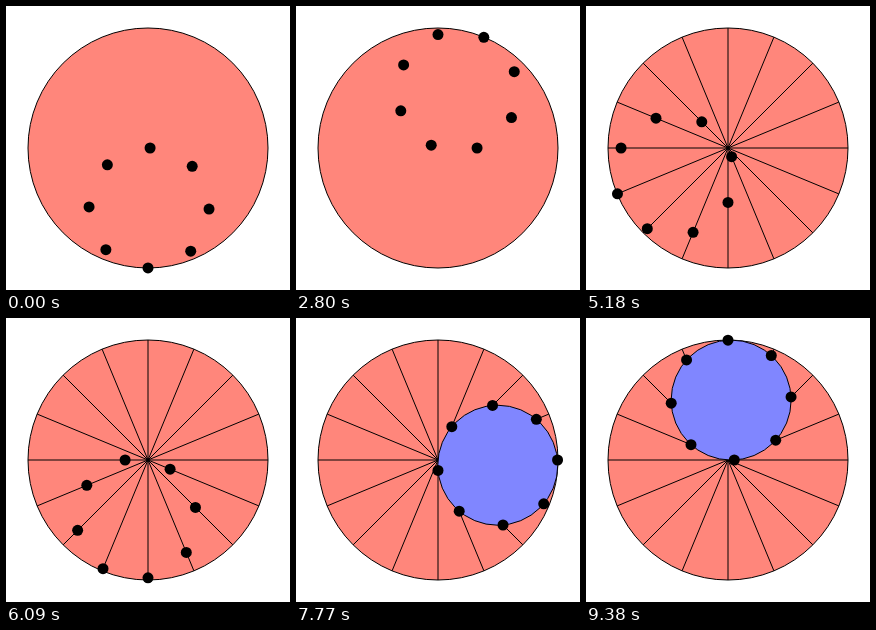
Animation of 284 by 284 pixels, one loop 9.45 s. Source, as an HTML page:

```html
<!DOCTYPE html>
<html lang="en">
<head>
<meta charset="utf-8">
<title>Rolling circle</title>
<style>
  html, body { margin: 0; width: 100%; height: 100%; overflow: hidden; background: #fff; }
  svg { display: block; width: 100%; height: 100%; }
  .outline { stroke: #000; stroke-width: 1; }
</style>
</head>
<body>
<svg viewBox="0 0 284 284">
  <g id="stage" transform="translate(142 142)">
    <circle class="outline" r="120" fill="#ff867b"/>
  </g>
</svg>
<script>
const RADIUS = 120, DOTS = 8;
const STEP_MS = 70, STEPS = 135, DEGREES_PER_STEP = 4;
const SPOKES_FROM = 45, DISC_FROM = 90;
const rad = degrees => degrees * Math.PI / 180;
const stage = document.getElementById('stage');

function add(tag, attributes, parent = stage) {
  const node = document.createElementNS(stage.namespaceURI, tag);
  for (const name in attributes) node.setAttribute(name, attributes[name]);
  return parent.appendChild(node);
}

function place(circle, radius, angle) {
  circle.setAttribute('cx', radius * Math.cos(angle));
  circle.setAttribute('cy', radius * Math.sin(angle));
}

function show(node, visible) {
  node.setAttribute('visibility', visible ? 'visible' : 'hidden');
}

const angles = Array.from({ length: DOTS }, (_, i) => rad(i * 180 / DOTS));
const spokes = add('g', { class: 'outline' });
for (const angle of angles) {
  const x = RADIUS * Math.cos(angle), y = RADIUS * Math.sin(angle);
  add('line', { x1: -x, y1: -y, x2: x, y2: y }, spokes);
}
const disc = add('circle', { class: 'outline', r: RADIUS / 2, fill: '#8086ff' });
const dots = angles.map(() => add('circle', { r: 5.5 }));

// Each dot on the rolling circle travels along one diameter of the large circle.
function draw() {
  const step = Math.floor(performance.now() / STEP_MS) % STEPS;
  const roll = rad(89 - DEGREES_PER_STEP * step);
  show(spokes, step >= SPOKES_FROM);
  show(disc, step >= DISC_FROM);
  place(disc, RADIUS / 2, roll);
  dots.forEach((dot, i) => place(dot, RADIUS * Math.cos(roll - angles[i]), angles[i]));
  requestAnimationFrame(draw);
}
draw();
</script>
</body>
</html>
```
